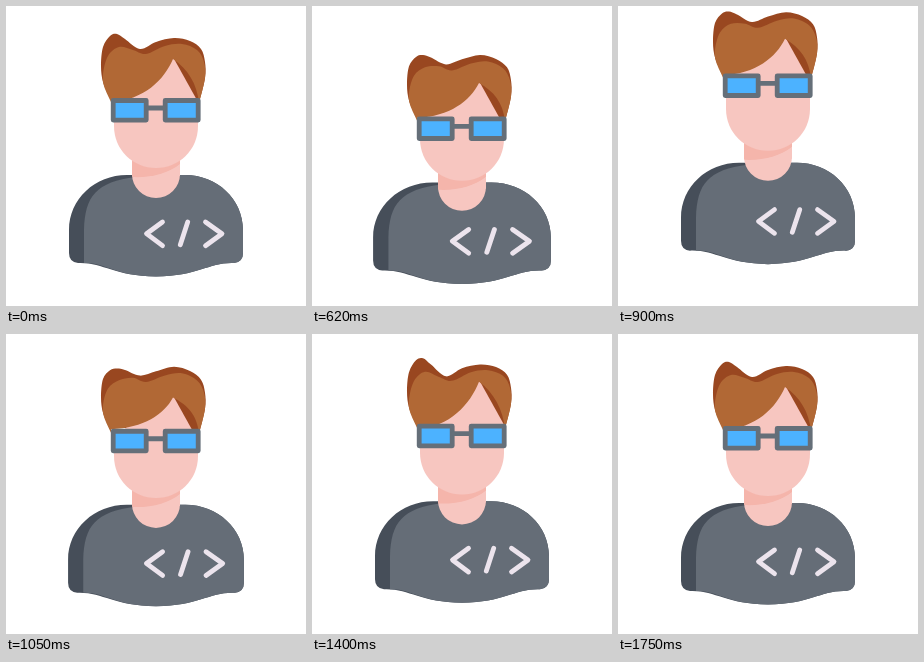
An HTML page with a canvas that plays this animation: 300 by 300 pixels, repeating every 1.77 s.

```html
<!DOCTYPE html>
<html lang="en">
<head>
<meta charset="utf-8">
<title>Developer bounce</title>
<style>
html, body { margin: 0; width: 100%; height: 100%; overflow: hidden; background: #fff; }
canvas { display: block; width: 300px; height: 300px; }
</style>
</head>
<body>
<canvas id="stage"></canvas>
<script>
const LOOP = 1770, START = 520, END = 1750;
const canvas = document.getElementById('stage');
const ratio = window.devicePixelRatio || 1;
canvas.width = canvas.height = Math.round(300 * ratio);
const ctx = canvas.getContext('2d');

const skin = '#f7c6c0', skinShade = '#f5b5ab';
const hairLight = '#b16835', hairDark = '#994720';
const shirt = '#656d77', shirtDark = '#464e59';
const frameGrey = '#656f79', lens = '#4cb2ff', print = '#ece4ed';

// Turning points of each swing: [time, offset]
const headSwing = [[475, 0], [640, 19], [865, -26], [1200, 23], [1440, -4], [1630, .6], [END, 0]];
const bodySwing = [[475, 0], [620, 7.5], [845, -14], [1160, 7.5], [1350, -2], [1620, 1], [END, 0]];
const hairSwing = [[500, 0], [740, 1], [900, .4], [1200, 1], [1420, -.3], [1600, 0], [END, 0]];

// Sine ease from one turning point to the next
function swing(turns, t) {
  if (t < START || t >= END) return 0;
  const i = turns.findIndex(p => p[0] > t);
  const [t0, v0] = turns[i - 1], [t1, v1] = turns[i];
  return v0 + (v1 - v0) * (1 - Math.cos(Math.PI * (t - t0) / (t1 - t0))) / 2;
}

const backHair = [[103, 90], [97, 76], [95, 60], [97, 41], [104, 30], [111, 28], [119, 33],
  [134, 43], [150, 36], [168, 32], [184, 35], [195, 43], [199, 56], [199, 72], [193, 97]];
const frontHair = [[105, 96], [98, 80], [97, 68], [102, 50], [113, 41], [127, 44], [140, 48],
  [159, 40], [176, 38], [191, 44], [198, 56], [199, 72], [193, 97]];

const bump = (x, center, width) => Math.exp(-(((x - center) / width) ** 2));

// Flattening sinks the quiff and lifts the dip, most of all near the top
function flatten([x, y], flat) {
  const reach = Math.min(1, Math.max(0, (80 - y) / 50));
  const move = 6 * bump(x, 109, 12) - 8 * bump(x, 133, 13) - 3 * bump(x, 168, 16);
  return [x, y + flat * reach * move];
}

function smoothThrough(pts) {
  ctx.beginPath();
  ctx.moveTo(...pts[0]);
  for (let i = 0; i < pts.length - 1; i++) {
    const a = pts[Math.max(i - 1, 0)], b = pts[i], c = pts[i + 1];
    const d = pts[Math.min(i + 2, pts.length - 1)];
    ctx.bezierCurveTo(b[0] + (c[0] - a[0]) / 6, b[1] + (c[1] - a[1]) / 6,
      c[0] - (d[0] - b[0]) / 6, c[1] - (d[1] - b[1]) / 6, c[0], c[1]);
  }
}

function fill(color) {
  ctx.closePath();
  ctx.fillStyle = color;
  ctx.fill();
}

function shape(d, color) {
  ctx.fillStyle = color;
  ctx.fill(new Path2D(d));
}

function line(d, color) {
  ctx.strokeStyle = color;
  ctx.lineWidth = 4.8;
  ctx.lineCap = ctx.lineJoin = 'round';
  ctx.stroke(new Path2D(d));
}

function drawBody(dy) {
  ctx.save();
  ctx.translate(150, dy);
  ctx.scale(1 + .008 * Math.sqrt(Math.max(dy, 0)), 1);
  ctx.translate(-150, 0);
  const right = 'H179C211 169 237 193 237 224V247Q237 256 228 257C203 256 193 270 150 270.5';
  shape(`M121 169${right}C107 270 97 256 72 257Q63 256 63 247V224C63 193 89 169 121 169Z`, shirtDark);
  shape(`M130 171L150 169${right}C108 270 99 256 78 257V224C79 190 90 176 130 171Z`, shirt);
  line('M156.5 216L140.5 227.7L156.5 239.7M181.7 216L174.3 238.7M199.5 216L216 227.7L199.5 239.7', print);
  ctx.restore();
}

function drawNeck(chin) {
  const bottom = chin + 30;
  ctx.save();
  shapeNeck: {
    ctx.beginPath();
    ctx.rect(126, chin - 30, 48, 38);
    ctx.arc(150, bottom - 24, 24, 0, Math.PI);
  }
  fill(skin);
  ctx.clip();
  ctx.beginPath();
  ctx.moveTo(126, chin - 20);
  ctx.lineTo(126, chin + 9);
  ctx.bezierCurveTo(145, chin + 10, 163, chin + 5, 174, chin - 4);
  ctx.lineTo(174, chin - 20);
  fill(skinShade);
  ctx.restore();
}

function drawFace(top, chin) {
  ctx.beginPath();
  ctx.moveTo(108, top + 45);
  ctx.lineTo(108, chin - 42);
  ctx.bezierCurveTo(108, chin - 18, 127, chin, 150, chin);
  ctx.bezierCurveTo(173, chin, 192, chin - 18, 192, chin - 42);
  ctx.lineTo(192, top + 45);
  ctx.lineTo(167, top);
  ctx.lineTo(150, top);
  fill(skin);
}

function drawGlasses() {
  for (const x of [107.2, 159.2]) {
    ctx.fillStyle = lens;
    ctx.fillRect(x, 94.5, 33, 19.6);
    line(`M${x} 94.5h33v19.6h-33Z`, frameGrey);
  }
  line('M142 102H158', frameGrey);
}

function drawHead(dy, chin, flat) {
  const pose = pts => smoothThrough(pts.map(p => flatten(p, flat)));
  const part = 53 + 11 * flat;
  ctx.save();
  ctx.translate(0, dy);
  pose(backHair);
  fill(hairDark);
  drawFace(part - 2, chin - dy);
  pose(frontHair);
  ctx.bezierCurveTo(191, 78, 182, part + 10 - 3 * flat, 167, part);
  ctx.bezierCurveTo(158, part + 21 - 6 * flat, 138, 94 - 4 * flat, 105, 96 - 5 * flat);
  fill(hairLight);
  drawGlasses();
  ctx.restore();
}

function draw(t) {
  const head = swing(headSwing, t);
  const chin = 162 + head * .7;
  ctx.setTransform(ratio, 0, 0, ratio, 0, 0);
  ctx.fillStyle = '#fff';
  ctx.fillRect(0, 0, 300, 300);
  drawBody(swing(bodySwing, t));
  drawNeck(chin);
  drawHead(head, chin, swing(hairSwing, t));
}

const begin = performance.now();
function tick() {
  draw((performance.now() - begin) % LOOP);
  requestAnimationFrame(tick);
}
draw(0);
requestAnimationFrame(tick);
</script>
</body>
</html>
```
